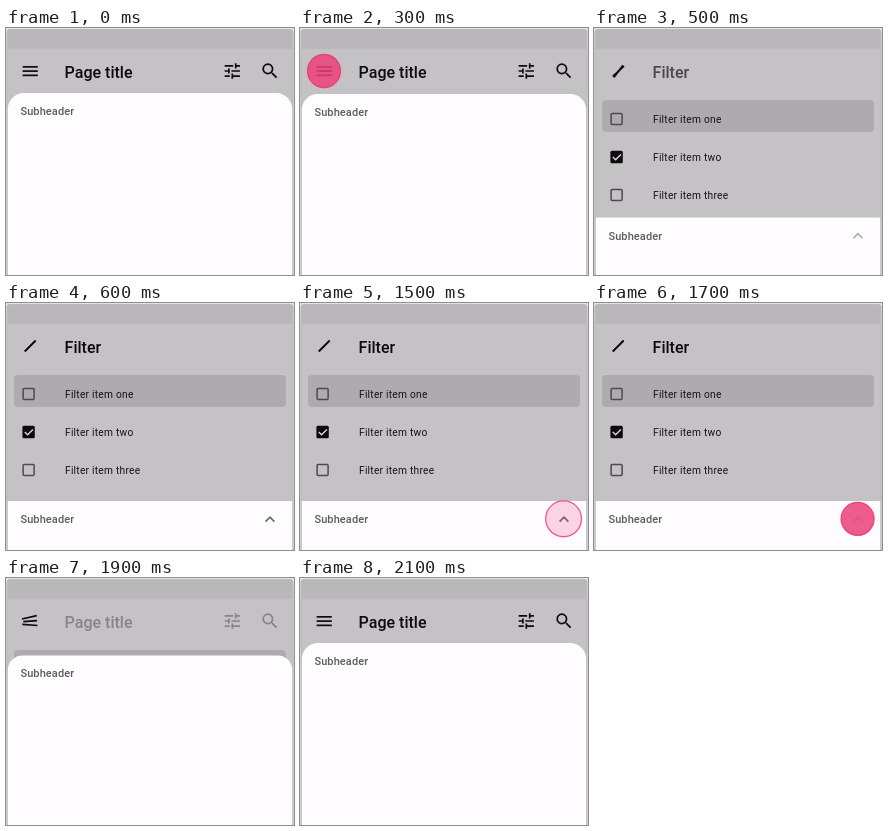
These frames come from a looping animation (288x247 px, 2500 ms). An HTML page with a canvas:

```html
<!DOCTYPE html>
<html lang="en">
<head>
<meta charset="utf-8">
<title>Backdrop filter</title>
<style>
html, body { margin: 0; width: 100%; height: 100%; overflow: hidden; background: #e4e3e4; }
canvas { display: block; width: 288px; height: 247px; }
</style>
</head>
<body>
<canvas id="stage"></canvas>
<script>
const W = 288, H = 247, LOOP = 2500, STEP = 100;
const OPEN = 299, CLOSE = 1742;
const INK = '#0b0b0b', PINK = '#ec407a', SHEET = '#fefcff';
const canvas = document.getElementById('stage');
const ratio = window.devicePixelRatio || 1;
canvas.width = W * ratio;
canvas.height = H * ratio;
const ctx = canvas.getContext('2d');

const tune = new Path2D('M3 17v2h6v-2H3zM3 5v2h10V5H3zm10 16v-2h8v-2h-8v-2h-2v6h2zM7 9v2H3v2h4v2h2V9H7zm14 4v-2H11v2h10zm-6-4h2V7h4V5h-4V3h-2v6z');
const search = new Path2D('M15.5 14h-.79l-.28-.27A6.47 6.47 0 0 0 16 9.5 6.5 6.5 0 1 0 9.5 16c1.61 0 3.09-.59 4.23-1.57l.27.28v.79l5 4.99L20.49 19l-4.99-5zm-6 0C7.01 14 5 11.99 5 9.5S7.01 5 9.5 5 14 7.01 14 9.5 11.99 14 9.5 14z');

// Progress from 0 to 1 between two times: linear, and slowing down
const ramp = (t, from, to) => Math.min(1, Math.max(0, (t - from) / (to - from)));
const ease = (t, from, to) => 1 - (1 - ramp(t, from, to)) ** 2.5;

function text(str, x, y, size, weight, color, gap = 0) {
  ctx.font = `${weight} ${size}px Roboto, Arial, sans-serif`;
  ctx.letterSpacing = gap + 'px';
  ctx.fillStyle = color;
  ctx.fillText(str, x, y);
}

function box(x, y, w, h, r, color) {
  ctx.fillStyle = color;
  ctx.beginPath();
  ctx.roundRect(x, y, w, h, r);
  ctx.fill();
}

function tick(x, y, w, h, color, width) {
  ctx.strokeStyle = color;
  ctx.lineWidth = width;
  ctx.beginPath();
  ctx.moveTo(x - w, y - h);
  ctx.lineTo(x, y);
  ctx.lineTo(x + Math.abs(h) * (h > 0 ? 1.9 : 1), y - h * (h > 0 ? 1.9 : 1));
  ctx.stroke();
}

function glyph(path, cx, cy) {
  ctx.save();
  ctx.translate(cx, cy);
  ctx.scale(.85, .85);
  ctx.translate(-12, -12);
  ctx.fillStyle = INK;
  ctx.fill(path);
  ctx.restore();
}

function faded(alpha, paint) {
  if (alpha <= 0) return;
  ctx.save();
  ctx.globalAlpha = alpha;
  paint();
  ctx.restore();
}

// Three bars turn at different speeds into a cross; the middle one shrinks away
function menuIcon(p, dir) {
  for (let i = -1; i <= 1; i++) {
    const len = i ? 15.2 : 15.2 * (1 - p);
    ctx.save();
    ctx.translate(24.2, 43.1);
    ctx.rotate(dir * p * (.25 - .5 * i) * Math.PI);
    box(-len / 2, i * 4.25 * (1 - p) - .85, len, 1.7, 0, INK);
    ctx.restore();
  }
}

function tap(x, y, t, press, release) {
  const down = ramp(t, press, press + 200);
  const alpha = .85 * down * (1 - ramp(t, release, release + 140));
  faded(alpha, () => {
    ctx.fillStyle = ctx.strokeStyle = PINK;
    ctx.lineWidth = 1.3;
    ctx.beginPath();
    ctx.arc(x, y, 18.4 - 1.9 * down, 0, Math.PI * 2);
    ctx.fill();
    ctx.globalAlpha = Math.min(1, alpha * 4);
    ctx.stroke();
  });
}

function item(label, y, checked) {
  if (checked) {
    box(16.4, y - 6.2, 12.4, 12.4, 1.5, INK);
    tick(21.6, y + 2.8, 2.8, 2.8, '#d8d6d8', 1.4);
  } else {
    ctx.strokeStyle = '#4c4b4c';
    ctx.lineWidth = 1.5;
    ctx.beginPath();
    ctx.roundRect(17.1, y - 5.5, 11, 11, 1);
    ctx.stroke();
  }
  text(label, 59, y + 4, 10.2, 400, '#141414', .25);
}

function draw(t) {
  const open = ease(t, OPEN, 600) - ease(t, CLOSE, 2000);
  const title = 1 - ramp(t, OPEN, 412) + ramp(t, 1840, 2020);
  const filter = ramp(t, 400, 550) - ramp(t, CLOSE, 1842);
  const chevron = ramp(t, 400, 600) - ramp(t, 1600, 1800);
  ctx.setTransform(ratio, 0, 0, ratio, 0, 0);

  box(0, 0, W, H, 0, '#e4e3e4');
  box(.5, 1, 287, H, [4, 4, 0, 0], '#b5b3b5');
  box(1.5, 1.5, 285, H, [3, 3, 0, 0], '#c4c2c4');
  box(1.5, 1.5, 285, 19.5, [3, 3, 0, 0], '#b9b7b9');

  faded(title, () => {
    text('Page title', 58.6, 50, 16, 500, INK);
    glyph(tune, 226.3, 43);
    glyph(search, 264, 43);
  });
  faded(filter, () => text('Filter', 58.6, 50, 16, 500, INK));

  box(8, 72, 272, 32, 4, '#adabad');
  ['one', 'two', 'three'].forEach((n, i) => item('Filter item ' + n, 91 + 38 * i, i === 1));

  menuIcon(open, t < CLOSE ? 1 : -1);
  tap(24, 43, t, 50, OPEN);

  const top = 65 + 133 * open, r = 16 * (1 - open);
  box(1.8, top, 284.4, H - top + 1, [r, r, 0, 0], SHEET);
  text('Subheader', 14.4, top + 22, 11, 500, '#5d5c5e', .1);
  faded(chevron, () => tick(264, top + 16.2, 4.4, -4.4, '#666567', 1.7));
  tap(263.6, 215.8, t, 1450, CLOSE);
}

const start = performance.now();
function frame() {
  const t = (performance.now() - start) % LOOP;
  draw(Math.floor(t / STEP) * STEP);
  requestAnimationFrame(frame);
}
frame();
</script>
</body>
</html>
```
